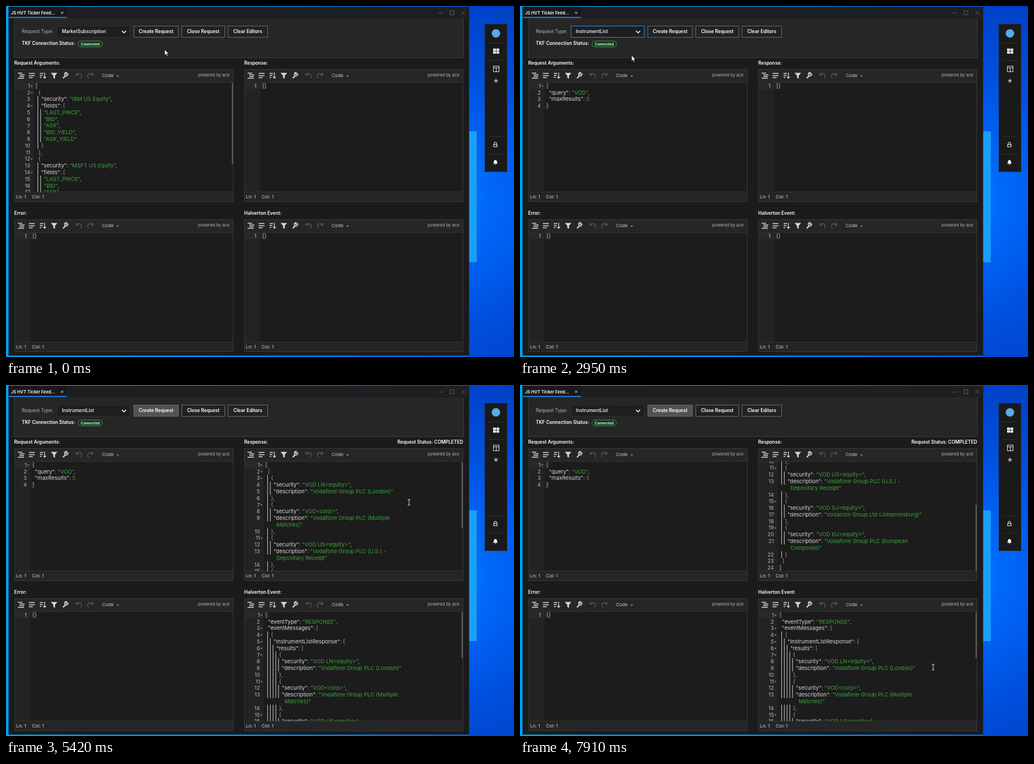
These frames come from a looping animation (900 px wide and 622 px high, 8 s). An HTML page:

```html
<!DOCTYPE html>
<html lang="en">
<head>
<meta charset="utf-8">
<title>Market request console</title>
<style>
html, body { margin: 0; width: 100%; height: 100%; overflow: hidden; background: #0050d8; }
svg { display: block; }
#stage { width: 100vw; height: 100vh; }
text { font-family: Inter, "Open Sans", sans-serif; white-space: pre; }
</style>
</head>
<body>
<svg id="stage" viewBox="0 0 900 622">
  <defs>
    <linearGradient id="sky">
      <stop offset="0" stop-color="#00a2f0"/><stop offset=".5" stop-color="#008cf0"/>
      <stop offset=".91" stop-color="#0062ec"/><stop offset="1" stop-color="#0046d0"/>
    </linearGradient>
    <radialGradient id="glow" gradientUnits="userSpaceOnUse" cx="760" cy="340" r="380">
      <stop offset="0" stop-color="#0a84ff"/><stop offset=".25" stop-color="#0068fa"/>
      <stop offset=".6" stop-color="#0050de"/><stop offset="1" stop-color="#003ec2"/>
    </radialGradient>
  </defs>
  <g id="base"></g>
  <g id="live"></g>
</svg>
<script>
const LOOP = 8000, ROW = 11.78, INDENT = 4.85, VIEW_W = 387, VIEW_H = 194;
const LEFT = 15, RIGHT = 422, TOP = 112, BOTTOM = 378;
const BLUE = '#1e90ff';

const esc = s => s.replace(/&/g, '&amp;').replace(/</g, '&lt;');
const rect = (x, y, w, h, fill, stroke = 'none', extra = '') =>
  `<rect x="${x}" y="${y}" width="${w}" height="${h}" fill="${fill}" stroke="${stroke}" ${extra}/>`;
const box = (x, y, w, h, fill, stroke) => rect(x + .5, y + .5, w - 1, h - 1, fill, stroke);
const line = (d, color, width = 1) => `<path d="${d}" fill="none" stroke="${color}" stroke-width="${width}"/>`;
const shape = (d, fill, extra = '') => `<path d="${d}" fill="${fill}" ${extra}/>`;
const at = (x, y, content) => `<g transform="translate(${x} ${y})">${content}</g>`;
const write = (x, y, s, size, fill = '#fff', weight = 500, anchor = 'start') =>
  `<text x="${x}" y="${y + size * .36}" font-size="${size}" font-weight="${weight}" fill="${fill}" text-anchor="${anchor}">${esc(s)}</text>`;
const label = (x, y, s, anchor) => write(x, y, s, 8.25, '#fff', 600, anchor);

// Documents are lists of rows: [level, text, isContinuation]
const subscription = (name, end) => [
  [1, '{'], [2, `"security": "${name} US Equity",`], [2, '"fields": ['],
  ...['LAST_PRICE', 'BID', 'ASK', 'BID_YIELD'].map(f => [3, `"${f}",`]),
  [3, '"ASK_YIELD"'], [2, ']'], [1, end]];
const subscriptions = [[0, '['], ...subscription('IBM', '},'), ...subscription('MSFT', '}'), [0, ']']];
const query = [[0, '{'], [1, '"query": "VOD",'], [1, '"maxResults": 5'], [0, '}']];
const empty = [[0, '{}']];
const found = [
  ['VOD LN<equity>', 'Vodafone Group PLC (London)'],
  ['VOD<corp>', 'Vodafone Group PLC (Multiple', 'Matches)'],
  ['VOD US<equity>', 'Vodafone Group PLC (U.S.) -', 'Depositary Receipt'],
  ['VOD SJ<equity>', 'Vodacom Group Ltd (Johannesburg)'],
  ['VOD EU<equity>', 'Vodafone Group PLC (European', 'Composite)']];
const results = level => found.flatMap(([id, text, rest], i) => [
  [level, '{'], [level + 1, `"security": "${id}",`],
  [level + 1, `"description": "${text}${rest ? '' : '"'}`],
  ...(rest ? [[level + 2, rest + '"', true]] : []),
  [level, i < found.length - 1 ? '},' : '}']]);
const response = [[0, '['], [1, '['], ...results(2), [1, ']'], [0, ']']];
const event = [[0, '{'], [1, '"eventType": "RESPONSE",'], [1, '"eventMessages": ['], [2, '{'],
  [3, '"InstrumentListResponse": {'], [4, '"results": ['], ...results(5),
  [4, ']'], [3, '}'], [2, '}'], [1, ']'], [0, '}']];

function colored(text, isContinuation) {
  if (isContinuation) return `<tspan fill="#3aa53a">${esc(text)}</tspan>`;
  return text.replace(/"\w+"(?=:)|"[^"]*"?|\d+|[^"\d]+/g, (part, i) => {
    const isKey = !i && text[part.length] === ':';
    const fill = part[0] === '"' ? (isKey ? '#d8d8d8' : '#3aa53a') : /\d/.test(part) ? '#b5652b' : '#a0a0a0';
    return `<tspan fill="${fill}">${esc(part)}</tspan>`;
  });
}

function editorBody(x, top, rows, scroll = 0, count = rows.length) {
  const textX = rows.length > 9 ? 37 : 31, height = count * ROW;
  let out = rect(0, 0, textX - 3, VIEW_H, '#232323') + rect(0, -scroll, textX - 3, ROW, '#292929');
  let number = 0;
  rows.forEach(([level, text, more], i) => {
    const y = 6 + i * ROW - scroll;
    if (!more) number++;
    if (y < -8 || y > VIEW_H + 8) return;
    if (!more) {
      out += write(textX - 9.7, y, '' + number, 9.3, '#b8b8b8', 400, 'end');
      if (/[[{]$/.test(text)) out += shape(`M${textX - 9} ${y - .6}h4l-2 2.4z`, '#909090');
      for (let l = 1; l < level; l++) out += rect(textX + l * INDENT - 1.4, y - 5.9, 1, ROW, '#d0d0d0');
    }
    if (!level) [...text].forEach((c, k) => {
      out += rect(textX - .5 + k * 3.7, y - 4.5, 3.7, 9.5, 'none', '#444', 'stroke-width=".8"');
    });
    out += `<text x="${textX + level * INDENT}" y="${y + 3.3}" font-size="9.55">${colored(text, more)}</text>`;
  });
  if (height > VIEW_H) {
    const k = VIEW_H / height;
    out += rect(VIEW_W - 2.5, 1 + scroll * k, 2.5, VIEW_H * k - 1, '#585858');
  }
  return `<svg x="${x + .5}" y="${top + 23.5}" width="${VIEW_W}" height="${VIEW_H}">${out}</svg>`;
}

function editorFrame(x, top, name) {
  const on = '#d8d8d8', off = '#555';
  const icons =
    line('M6 7h8M9 10h9M9 13h8M6 16h11M25.500 7.500h10.500M25.500 11.500h10.500M25.500 15h7M45 7.500h6M45 11h5M45 14.500h3', on, 1.4) +
    line('M53.500 6v10M51 13.500l2.500 2.500 2.500 -2.500', on, 1.3) +
    shape('M64.500 6.500h11.500l-4.200 5v5.500l-3 -2v-3.500z', on) +
    line('M86 16l5 -5', on, 2.3) +
    line('M94.500 7.300l-2.300 2.300 -1.800 -1.800 2 -2a3.200 3.200 0 1 0 2.100 1.500', on, 1.4) +
    line('M109.500 6.500v4h4M109.800 10a5 4.600 0 0 1 9.200 2q0 2.800 -2.200 4', off, 1.4) +
    line('M139 6.500v4h-4M138.700 10a5 4.600 0 0 0 -9.200 2q0 2.800 2.200 4', off, 1.4) +
    shape('M181 11h4l-2 2.400z', '#aaa');
  return label(x - (x > 400 ? 0 : .5), top - 10.5, name) +
    box(x, top, 388, 235, '#1c1c1c', '#3a3a3a') +
    rect(x + 1, top + 1, 386, 22, '#262626') + rect(x + 1, top + 218, 386, 16, '#252525') +
    line(`M${x} ${top + 23.5}h388M${x} ${top + 217.5}h388`, '#343434') +
    at(x, top, icons) +
    write(x + 155, top + 11.5, 'Code', 8.2, '#b0b0b0') +
    write(x + 381, top + 10.5, 'powered by ace', 7.4, '#b0b0b0', 400, 'end') +
    write(x + 3, top + 226, 'Ln: 1', 8.2, '#b8b8b8') + write(x + 31, top + 226, 'Col: 1', 8.2, '#b8b8b8');
}

const button = (x, w, name, fill = '#222', stroke = '#6a6a6a') =>
  box(x, 35, w, 21, fill, stroke) + write(x + w / 2, 45.5, name, 8.25, '#fff', 600, 'middle');

function sidebar() {
  let grid = '';
  for (let i = 0; i < 4; i++) grid += rect(863 + i % 2 * 5.8, 75.5 + (i >> 1) * 4.9, 5, 4, '#fff');
  let star = '';
  for (let i = 0; i < 10; i++) {
    const a = i * Math.PI / 5, r = i % 2 ? 1.9 : 4.5;
    star += `${868 + r * Math.sin(a)},${132.5 - r * Math.cos(a)} `;
  }
  return box(848, 32, 40, 262, '#1a1a1a', '#262626') +
    line('M855 65.500h26M855 96.500h26M855 231.500h26M855 262.500h26', '#303030') +
    '<circle cx="868" cy="48.500" r="7.500" fill="#5aa9e6"/>' + grid +
    line('M863.500 106.500h10v10h-10zM863.500 109.500h10M868.500 109.500v7', '#e8e8e8') +
    `<polygon points="${star}" fill="#aaa"/>` +
    line('M865 245v-1.500a2 2 0 0 1 4 0v1.500M864 245.500h6v4h-6z', '#e8e8e8', 1.2) +
    shape('M863 279.500q1.500 -1 1.500 -4a2.600 2.600 0 0 1 5.200 0q0 3 1.500 4zM866 280.500h2.400l-1.200 1.500z', '#fff');
}

function scenery() {
  return rect(0, 0, 900, 622, 'url(#sky)') + rect(820, 0, 80, 622, 'url(#glow)') +
    rect(602, 222, 232, 232, '#18a0f8') +
    rect(4.5, 1.5, 816, 618, '#1b1b1b') + rect(4.5, 1.5, 816, 20.5, '#1e1f22') + rect(5, 1.5, 103, 18.5, '#18191b') +
    rect(5, 19.5, 103, 1.7, BLUE) +
    write(9, 12.3, 'JS HVT Ticker Feed...', 7.45, '#fff', 600) +
    line('M97.500 10l4 4m0 -4l-4 4', '#ddd', 1) +
    line('M766.500 12.500h7M786.500 8.500h7v7h-7zM807 9l6.500 6.500m0 -6.500l-6.500 6.500', '#5c5c5c') +
    rect(15, 22, 795, 69, '#262626') + line('M14.500 22v69.500h796V22', '#3a3a3a') +
    write(28, 45.5, 'Request Type:', 8.25, '#b4b4b4', 400) +
    label(28, 66.5, 'TKF Connection Status:') +
    rect(127.5, 62, 43.5, 10.5, '#14351d', '#2f9e4c', 'rx="5.250"') +
    write(149.2, 67.3, 'Connected', 6.3, '#fff', 600, 'middle') +
    button(311, 77, 'Close Request') + button(393, 71, 'Clear Editors') +
    editorFrame(LEFT, TOP, 'Request Arguments:') + editorFrame(RIGHT, TOP, 'Response:') +
    editorFrame(LEFT, BOTTOM, 'Error:') + editorFrame(RIGHT, BOTTOM, 'Halverton Event:') +
    editorBody(LEFT, BOTTOM, empty) + sidebar();
}

// Pointer moves: start, end, steps, target
const start = [281, 77];
const moves = [
  [580, 990, 7, 206, 48], [1670, 2280, 9, 180, 100], [2950, 3450, 8, 255, 46],
  [4860, 5420, 9, 714, 208], [7430, 7910, 8, 732, 500]];
const clicks = [1190, 2480, 3590];
const options = ['MarketSubscription', 'HistoricalData', 'ReferenceData', 'IntraDayBar', 'InstrumentList',
  'Snapshot', 'FieldList', 'FieldSearch', 'UserEntitlements'];

function pointerAt(t) {
  let [x, y] = start;
  for (const [from, to, steps, tx, ty] of moves) {
    if (t < from) break;
    const done = Math.min(1, (Math.floor((t - from) / ((to - from) / (steps - 1)) + 1e-6) + 1) / steps);
    const ease = 1 - (1 - done) ** 2;
    x += (tx - x) * ease;
    y += (ty - y) * ease;
  }
  return [x, y];
}

function cursor(x, y, hand) {
  const edge = 'stroke="#000" stroke-width=".8" stroke-linejoin="round"';
  const beam = x > 451 && x < 810 && (y > 135 && y < 329 || y > 401 && y < 596);
  if (beam) return at(x, y, line('M-2.500 -5h2l.5 .5 .5 -.5h2M0 -5v10M-2.500 5h2l.5 -.5 .5 .5h2', '#e0e0e0', 1));
  if (hand) return at(x, y, shape('M-1.200 1q0 -1.300 1.200 -1.300t1.200 1.300v4l1.600 .2 .4 .4 1.600 .2 .4 .4q2 .2 2 1.800v2.200l-1.200 3.200h-6.500l-3.700 -5q-.6 -1.600 1 -1.500l2 1.400z', '#fff', edge));
  return at(x, y, shape('M0 0v10.500l2.400 -2.200 1.700 3.800 1.800 -.8 -1.700 -3.600h3.300z', '#fff', edge));
}

function dropdown(y) {
  const hot = Math.max(0, Math.floor((y - 57.5) / 10.5));
  return box(90, 56, 130.5, 96, '#1c1c1c', '#8a8a8a') + options.map((name, i) =>
    (i === hot ? rect(90.5, 56.5 + i * 10.45, 129.5, 10.6, BLUE) : '') +
    write(99.5, 62 + i * 10.45, name, 8.3)).join('');
}

function scene(t) {
  const [x, y] = pointerAt(t);
  const inRow = y > 35 && y < 56;
  const open = t >= 1190 && t < 2480;
  const overButton = inRow && x > 226 && x < 306;
  const overSelect = inRow && x > 90 && x < 220;
  const focused = t >= 1260 && t < 3590;
  const scroll = t < 5950 ? 0 : t < 6410 ? 39.25 : t < 6690 ? 78.5 : t < 6950 ? 117.75 : 124;
  const status = t < 3660 ? '' : t < 3870 ? 'OPENED' : 'COMPLETED';

  let out = box(90, 35, 130.5, 21, '#1e1e1e', focused ? BLUE : '#303030') +
    write(99, 45.5, options[t < 2480 ? 0 : 4], 8.3) +
    line('M205.500 44l3.700 3.700 3.700 -3.700', '#fff', 1.6) +
    (overButton ? button(226, 80, 'Create Request', '#5c5c5c', '#8a8a8a')
      : t >= 3590 ? button(226, 80, 'Create Request', '#525252', '#686868')
      : button(226, 80, 'Create Request'));
  if (status) out += label(810, 101, 'Request Status: ' + status, 'end');
  out += editorBody(LEFT, TOP, t < 2550 ? subscriptions : query) +
    editorBody(RIGHT, TOP, t < 3870 ? empty : response, scroll) +
    (t < 3970 ? editorBody(RIGHT, BOTTOM, empty) : editorBody(RIGHT, BOTTOM, event, 0, 39));
  if (open) out += dropdown(y);
  for (const c of clicks) if (t >= c && t < c + 140)
    out += `<circle cx="${x - .5}" cy="${y - 1}" r="8" fill="#c8b400" opacity="${t < c + 70 ? .8 : .4}"/>`;
  return out + cursor(x, y, overButton || overSelect);
}

const live = document.getElementById('live');
document.getElementById('base').innerHTML = scenery();
let shown = '';
function tick() {
  const next = scene(performance.now() % LOOP);
  if (next !== shown) live.innerHTML = shown = next;
  requestAnimationFrame(tick);
}
tick();
</script>
</body>
</html>
```
